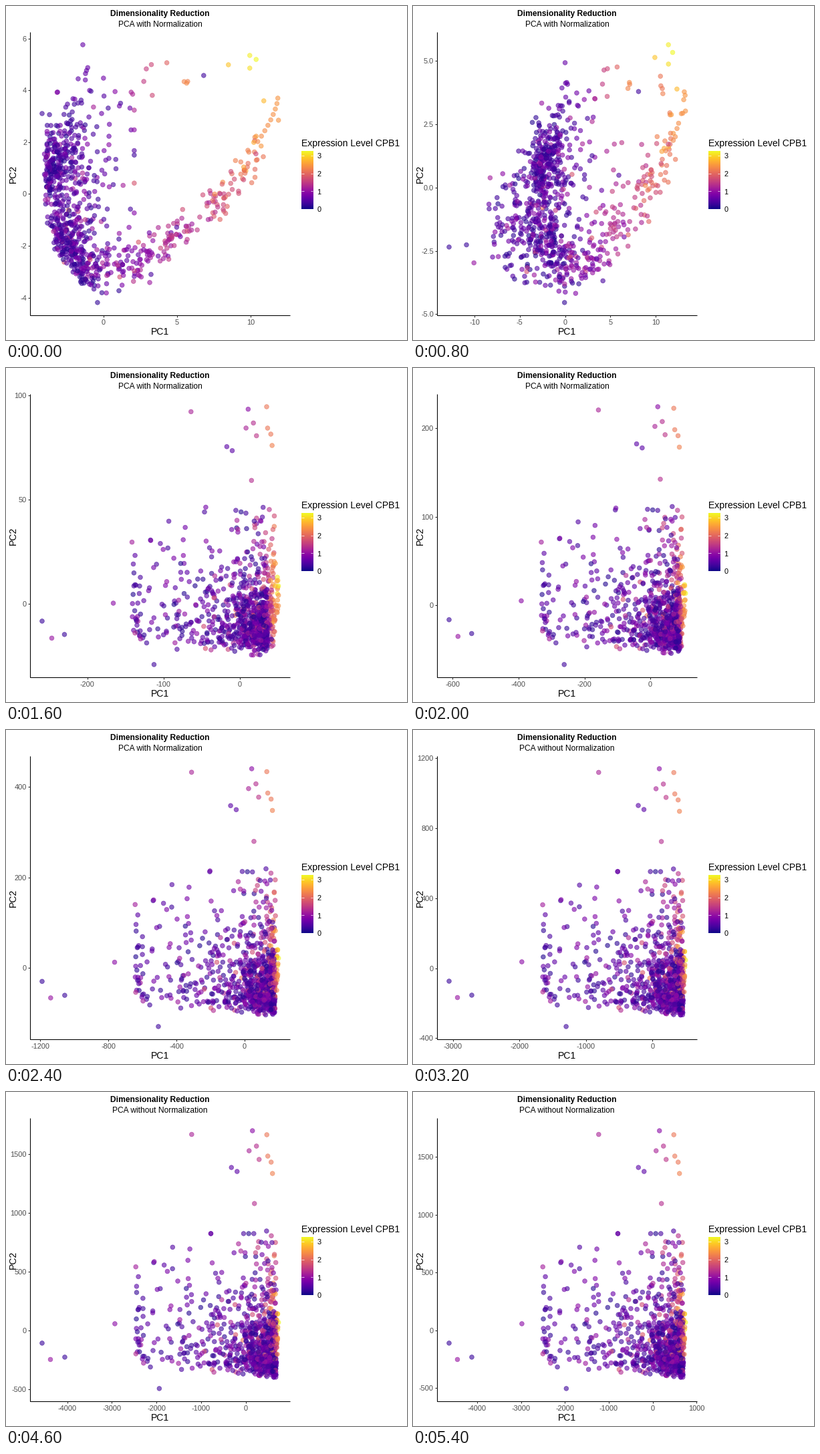
A matplotlib script that plays this animation: 600x500 px, repeating every 8000 ms.

```python
import math

import matplotlib.pyplot as plt
import numpy as np
from matplotlib.animation import FuncAnimation
from matplotlib.collections import LineCollection

W, H, DPI = 600, 500, 100
FRAMES, HOLD, STEPS = 80, 4, 50
LEFT, RIGHT, TOP, BOTTOM = 36.3, 425.4, 38.7, 463.2
VMAX = 3.2

plt.rcParams["font.family"] = "Liberation Sans"
rng = np.random.default_rng(11)

# Stage position in the first pose, in the last pose, expression level
FAR = [
    (73, 364, 54, 376, .25), (125, 377, 66.5, 400.5, 1), (92, 351, 88, 397, .25),
    (118, 392, 163, 347, .9), (62, 325, 229.5, 444, .3),
    (374.5, 80, 408, 345, 3.2), (137, 444, 370, 387, .2), (115, 58, 404, 427, .6),
]
# Points of the arm that end far up: last position, expression level
HIGH = [
    (278, 63.5, 1.2), (369, 58, .9), (390.5, 64, 2.1), (375, 81, 1.3), (364, 88, 1.2),
    (392, 96, 2.1), (379, 101, 1.4), (397, 105, 2.1), (399, 122, 2.2), (337.5, 113, .5),
    (346, 119, .5), (372, 167, 1.3),
]
# Rim of the first pose: position, expression level
RIM = [
    (54, 161, .3), (408, 171, 2.4), (365, 74, 3.1), (365, 93, 3), (333, 88, 2.8),
    (386, 142, 2.7), (272, 113, 2.2), (296, 104, .3),
]


def rows(*cols):
    return np.column_stack(cols)


def uniform(n, *spans):
    return [rng.uniform(a, b, n) for a, b in spans]


def path(s):
    knots = [0, .2, .5, .64, .82, 1]
    return (np.interp(s, knots, [128, 190, 255, 298, 335, 384]),
            np.interp(s, knots, [385, 388, 342, 310, 276, 208]))


def high():
    bx, by, v = np.array(HIGH).T
    x, y = path(np.clip((v - .3) / 2, .15, .9))
    return rows(x, y, bx, by, v)


def rim():
    x, y = uniform(17, (95, 280), (80, 140))
    band = rows(x, y, np.interp(x, [100, 150, 270], [.5, .7, 2.3]))
    t = np.linspace(0, 1, 9)
    side = rows(407 - 30 * t ** 1.5, 138 + 65 * t, 2.4 - .1 * t)
    strays = rows(*uniform(9, (145, 190), (150, 320), (.3, 1.3)))
    x, y, v = np.vstack([RIM, band, side, strays]).T
    bx = np.minimum(400 + 2.2 * v + rng.normal(0, 1, len(v)), 407)
    by = np.minimum(425 - 28 * v + rng.normal(0, 12, len(v)), 427)
    return rows(x, y, bx, by, v)


def fringe():
    bx, by, v = uniform(11, (185, 330), (225, 330), (.3, .9))
    return rows(rng.normal(118, 9, 11), rng.normal(365, 15, 11), bx, by, v)


def crescent():
    y = np.r_[rng.normal(235, 38, 290), rng.normal(360, 34, 300), rng.uniform(125, 350, 65)]
    y = np.where((y < 124) | (y > 436), rng.uniform(140, 380, len(y)), y)
    edge = np.interp(y, [122, 160, 280, 340, 370, 400, 436], [72, 56, 57, 64, 76, 97, 133])
    x = edge + rng.gamma(2, np.interp(y, [122, 240, 330, 436], [22, 11, 16, 8]))
    x[-65:] = 98 + rng.exponential(32, 65)
    x = np.minimum(x, 192)

    tail = rng.exponential(np.interp(y, [122, 200, 280, 340], [6, 18, 48, 82]))
    bx = 405 - tail
    bx = np.where(bx < 195, rng.uniform(194, 206, len(y)), bx)
    drop = rng.gamma(2, np.interp(y, [122, 200, 300], [6, 20, 30]))
    by = np.maximum(427 - .06 * (405 - bx) - drop, 212)
    v = .08 + 1.4 * rng.beta(1.5, 4, len(y)) + .8 * (rng.random(len(y)) < .04)
    return rows(x, y, bx, by, v)


def arm(n=190):
    s = rng.random(n)
    x, y = path(s)
    x = x + rng.normal(0, 7, n)
    y = np.clip(y + rng.normal(0, 14, n), 195, 425)
    v = np.interp(s, [0, .5, 1], [.8, 1.2, 2.2]) + rng.normal(0, .28, n)
    tail = rng.exponential(32 - 24 * s)
    bx = np.where(v > 1.8, rng.normal(400, 3, n), 404 - tail)
    by = 427 - rng.gamma(1.6, 28 + 48 * s)
    by = np.where(by < 208, rng.uniform(210, 390, n), by)
    return rows(x, y, np.minimum(bx, 406), by, np.clip(v, .3, 2.6))


pts = rng.permutation(np.vstack([FAR, high(), rim(), fringe(), crescent(), arm()]))
start = rows((pts[:, 0] - 146) / 22.05, (281.5 - pts[:, 1]) / 38.8)
end = rows((pts[:, 2] - 359) / .06575, (356.7 - pts[:, 3]) / .173)


def ease(p):
    return 4 * p ** 3 if p < .5 else 1 - 4 * (1 - p) ** 3


def breaks(lo, hi, m=5):
    """Extended Wilkinson axis breaks."""
    span, best, found = hi - lo, -2, (lo, hi - lo, 2)

    def score(simple, cover, dense):
        return .25 * simple + .2 * cover + .5 * dense + .05

    for j in range(1, 4):
        for i, q in enumerate((1, 5, 2, 2.5, 4, 3)):
            simple = 1 - i / 5 - j
            if score(simple + 1, 1, 1) < best:
                continue
            for k in range(2, 12):
                dense = 2 - (k - 1) / (m - 1) if k >= m else 1
                if score(simple + 1, 1, dense) < best:
                    break
                z = math.ceil(math.log10(span / (k + 1) / j / q))
                while True:
                    step = j * q * 10.0 ** z
                    extra = max(step * (k - 1) - span, 0)
                    if score(simple + 1, 1 - .25 * (extra / (.1 * span)) ** 2, dense) < best:
                        break
                    first = (math.floor(hi / step) - k + 1) * j
                    for a in range(first, math.ceil(lo / step) * j + 1):
                        b0 = a * step / j
                        b1 = b0 + step * (k - 1)
                        zero = a % j == 0 and b0 <= 0 <= b1
                        cover = 1 - .5 * ((hi - b1) ** 2 + (lo - b0) ** 2) / (.1 * span) ** 2
                        r = (k - 1) / (b1 - b0)
                        rt = (m - 1) / (max(b1, hi) - min(b0, lo))
                        total = score(simple + zero, cover, 2 - max(r / rt, rt / r))
                        if total > best:
                            best, found = total, (b0, step, k)
                    z += 1
    b0, step, k = found
    vals = [b0 + n * step for n in range(k)]
    return [v for v in vals if lo <= v <= hi]


def labels(vals):
    d = next((d for d in range(4) if all(abs(round(v, d) - v) < 1e-6 for v in vals)), 4)
    return [f"{v if abs(v) > 1e-9 else 0:.{d}f}" for v in vals]


fig = plt.figure(figsize=(W / DPI, H / DPI), dpi=DPI, facecolor="white")
ax = fig.add_axes([0, 0, 1, 1])
ax.axis("off")


def text(x, y, s, px, **kw):
    return ax.text(x, y, s, fontsize=px * 72 / DPI, **{"va": "baseline", **kw})


text(230.5, 15.2, "Dimensionality Reduction", 12, ha="center", weight="bold")
subtitle = text(230.5, 31.2, "", 12, ha="center")
text(230.5, 492, "PC1", 14, ha="center")
text(10.5, 251, "PC2", 14, ha="center", va="center", rotation=90)

rgba = plt.cm.plasma(np.clip(pts[:, 4] / VMAX, 0, 1))
rgba[:, 3] = .6
dots = ax.scatter(pts[:, 0], pts[:, 1], s=(6.7 * 72 / DPI) ** 2, facecolors=rgba,
                  edgecolors=rgba, linewidths=.54, zorder=2)

ax.plot([36.4, 36.4, RIGHT], [TOP, 463.4, 463.4], color="black", lw=.77,
        solid_capstyle="butt", solid_joinstyle="miter", zorder=3)
ticks = LineCollection([], colors="#333333", linewidths=.77, zorder=3)
ax.add_collection(ticks)
xlabels = [text(0, 477, "", 11, ha="center", color="#4d4d4d") for _ in range(11)]
ylabels = [text(31, 0, "", 11, ha="right", color="#4d4d4d") for _ in range(11)]

# Legend
text(441.5, 210, "Expression Level CPB1", 14)
ax.imshow(np.linspace(1, 0, 256)[:, None], cmap="plasma", extent=(442, 459.3, 304.3, 218),
          aspect="auto", zorder=2)
for n in range(4):
    y = 304 - 26.7 * n
    for x in (442, 455.8):
        ax.plot([x, x + 3.5], [y, y], color="white", lw=.5, solid_capstyle="butt", zorder=3)
    text(465.5, y + 4.3, str(n), 11)
ax.set_xlim(0, W)
ax.set_ylim(H, 0)


def fill(pool, names, place):
    for i, t in enumerate(pool):
        t.set_text(names[i] if i < len(names) else "")
        if i < len(names):
            place(t, i)


def update(i):
    e = ease(min(max((i - HOLD) / STEPS, 0), 1))
    pos = start + (end - start) * e
    lo, hi = pos.min(axis=0), pos.max(axis=0)
    pad = .05 * (hi - lo)
    lo, hi = lo - pad, hi + pad

    def sx(v):
        return LEFT + (RIGHT - LEFT) * (v - lo[0]) / (hi[0] - lo[0])

    def sy(v):
        return BOTTOM - (BOTTOM - TOP) * (v - lo[1]) / (hi[1] - lo[1])

    dots.set_offsets(rows(sx(pos[:, 0]), sy(pos[:, 1])))
    xs, ys = breaks(lo[0], hi[0]), breaks(lo[1], hi[1])
    fill(xlabels, labels(xs), lambda t, n: t.set_x(sx(xs[n])))
    fill(ylabels, labels(ys), lambda t, n: t.set_y(sy(ys[n]) + 4))
    ticks.set_segments([[(sx(v), 463.4), (sx(v), 466.4)] for v in xs]
                       + [[(33.4, sy(v)), (36.4, sy(v))] for v in ys])
    mode = "with" if i <= HOLD + STEPS // 2 else "without"
    subtitle.set_text(f"PCA {mode} Normalization")
    return [dots, ticks, subtitle, *xlabels, *ylabels]


anim = FuncAnimation(fig, update, frames=FRAMES, interval=100, repeat=True,
                     repeat_delay=0, blit=False)
plt.show()
```
